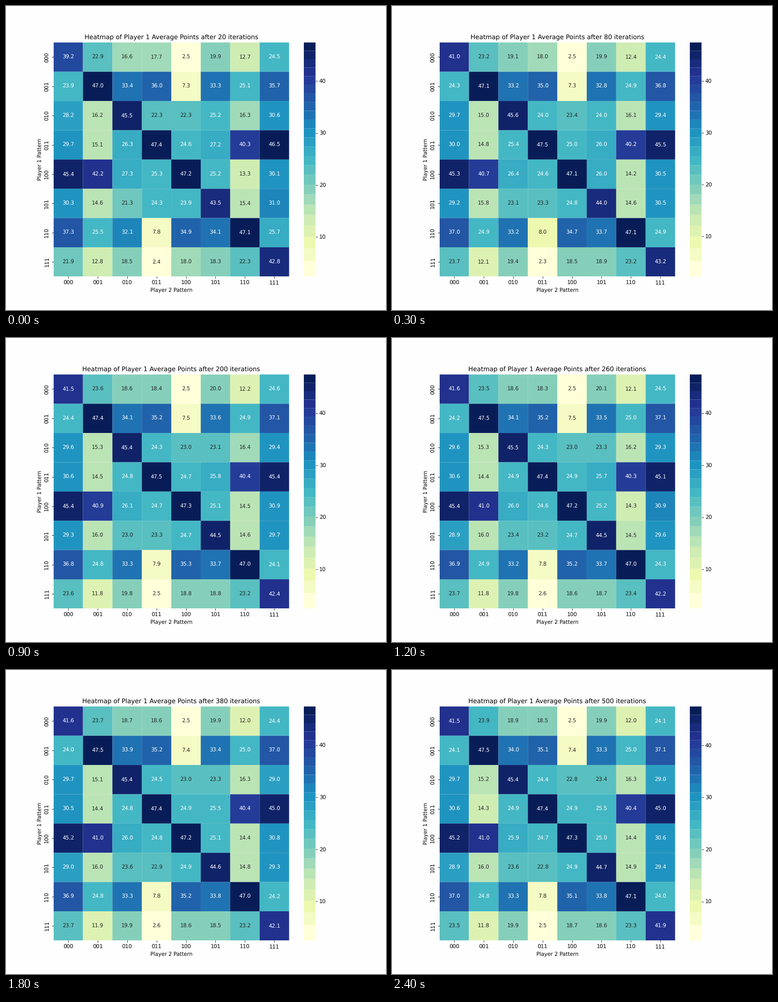
Animation, 837 px wide and 669 px high, one loop 2.5 s. Source, as a matplotlib script:

```python
import itertools

import matplotlib.pyplot as plt
import numpy as np
from matplotlib.animation import FuncAnimation
from matplotlib.colors import ListedColormap

DPI = 83.7
STEP = 20
FRAMES = 25
CARDS = 52
REPEATS = 4  # games averaged per iteration, keeps early values steady
PATTERNS = ["".join(bits) for bits in itertools.product("01", repeat=3)]


def play(games, rng):
    """Card game for all pattern pairs: whoever's pattern shows up takes the pile."""
    deck = np.arange(CARDS, dtype=np.int8) % 2
    decks = rng.permuted(np.tile(deck, (8, 8, games, 1)), axis=-1)
    mine = np.arange(8)[:, None, None]
    theirs = np.arange(8)[:, None]
    pile = np.full((8, 8, games), 2)
    points = np.zeros((8, 8, games))
    for t in range(2, CARDS):
        pile += 1
        code = 4 * decks[..., t - 2] + 2 * decks[..., t - 1] + decks[..., t]
        ready = pile >= 3
        won = ready & (code == mine)
        lost = ready & (code == theirs)
        points += np.where(won, pile, 0)
        pile[won | lost] = 0
    return points


def running_means():
    total = STEP * FRAMES
    points = play(total * REPEATS, np.random.default_rng(7))
    scores = points.reshape(8, 8, total, REPEATS).mean(axis=-1)
    means = np.cumsum(scores, axis=-1) / np.arange(1, total + 1)
    return means[..., STEP - 1::STEP]


def ink(level):
    """Dark text on light cells, white on dark ones."""
    rgb = np.array(smooth(level)[:3])
    linear = np.where(rgb <= .03928, rgb / 12.92, ((rgb + .055) / 1.055) ** 2.4)
    return ".15" if linear @ [.2126, .7152, .0722] > .408 else "w"


means = running_means()

# Stepped colour scale with wider steps at the pale end
BANDS = 24
smooth = plt.get_cmap("YlGnBu")
edges = np.linspace(0, 1, BANDS + 1) ** .85
banded = ListedColormap(smooth(np.linspace(0, 1, BANDS) ** .85))


def band(level):
    return np.clip(np.searchsorted(edges, level, side="right") - 1, 0, BANDS - 1)


plt.rcParams.update({"font.family": "DejaVu Sans", "text.hinting": "none"})
fig = plt.figure(figsize=(10, (669 + 1e-6) / DPI), dpi=DPI, facecolor="#fefefe")
ax = fig.add_axes([.125, .11, .62, .77])
bar_left, bar_width = .125 + .775 * .85, .77 * 669 / 20 / 837
bar = fig.add_axes([bar_left, .11, bar_width, .77])

style = dict(cmap=banded, vmin=0, vmax=BANDS - 1, antialiased=True, snap=False)
grid = np.arange(9)
mesh = ax.pcolormesh(grid, grid, np.zeros((8, 8)), **style)
ax.set(xlim=(0, 8), ylim=(8, 0), xlabel="Player 2 Pattern", ylabel="Player 1 Pattern")
ax.set_xticks(grid[:-1] + .5, PATTERNS)
ax.set_yticks(grid[:-1] + .5, PATTERNS, rotation="vertical", va="center")
title = ax.set_title("")
labels = [ax.text(c + .5, r + .5, "", ha="center", va="center")
          for r in range(8) for c in range(8)]

bar.pcolormesh([0, 1], edges, np.arange(BANDS)[:, None], **style)
bar.set(xlim=(0, 1), ylim=(0, 1), xticks=[])
bar.yaxis.tick_right()
for axes in (ax, bar):
    axes.spines[:].set_visible(False)


def update(i):
    values = means[..., i]
    low, high = values.min(), values.max()
    levels = (values - low) / (high - low)
    mesh.set_array(band(levels))
    for label, value, level in zip(labels, values.flat, levels.flat):
        label.set_text(f"{value:.1f}")
        label.set_color(ink(level))
    title.set_text("Heatmap of Player 1 Average Points "
                   f"after {STEP * (i + 1)} iterations")
    ticks = np.arange(10, 50, 10)
    bar.set_yticks((ticks - low) / (high - low), [str(t) for t in ticks])
    return [mesh, title, *labels]


anim = FuncAnimation(fig, update, frames=FRAMES, interval=100, repeat=True,
                     repeat_delay=0, blit=False)
plt.show()
```
